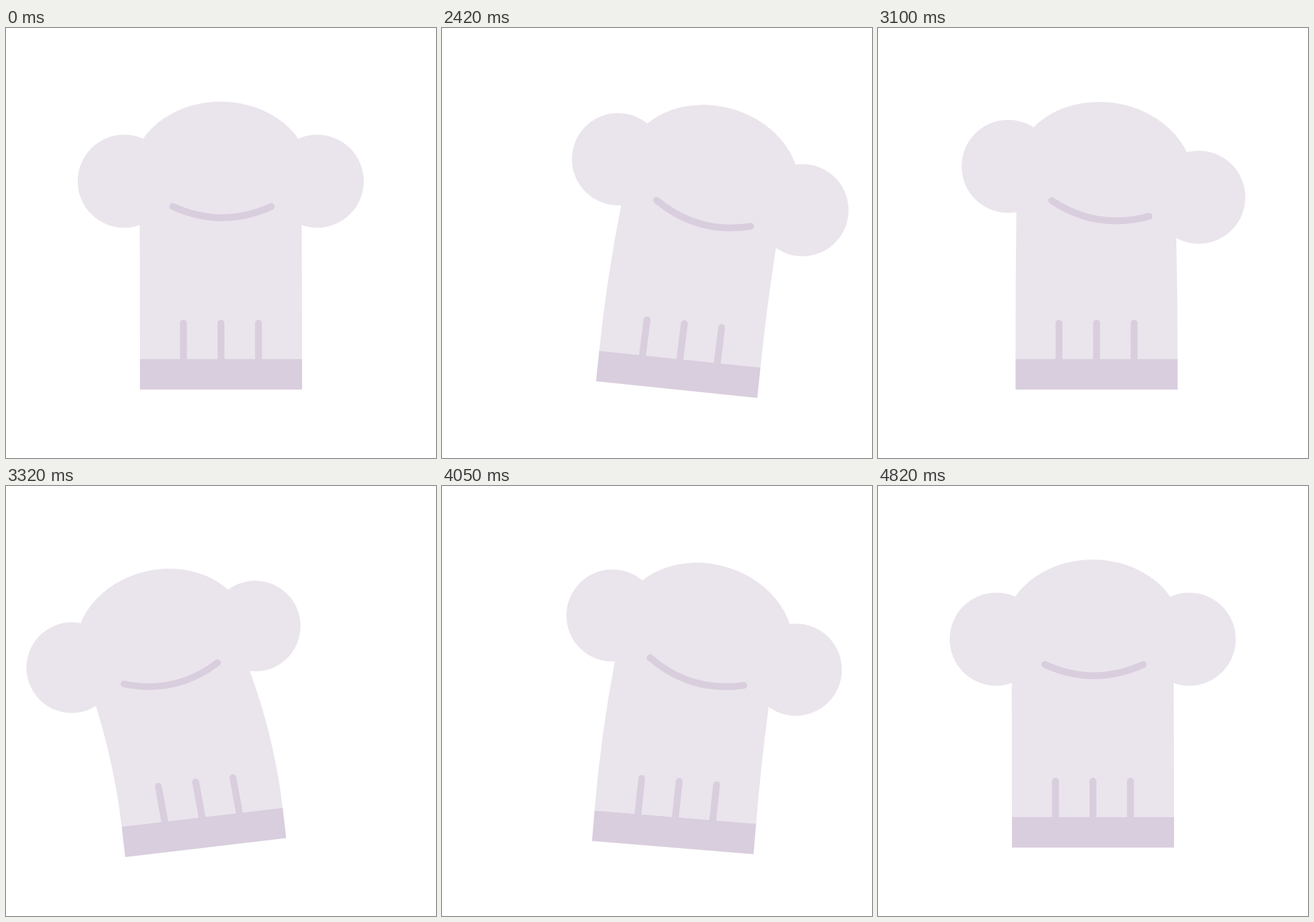
These frames come from a looping animation (748x748 px, 4850 ms). An HTML page with a canvas:

```html
<!DOCTYPE html>
<html lang="en">
<head>
<meta charset="utf-8">
<title>Swinging chef hat</title>
<style>
html, body { margin: 0; width: 100%; height: 100%; overflow: hidden; background: #fff; }
canvas { display: block; }
</style>
</head>
<body>
<canvas id="stage" width="748" height="748"></canvas>
<script>
const ctx = document.getElementById('stage').getContext('2d');
const LOOP = 4850, LIGHT = '#eae5ec', DARK = '#d9cede';
const NECK = 77.5, BODY = 232, BAND = 53;

// Start and end of each swing: right, left, right, left, rest
const swings = [[2000, 2645], [2760, 3490], [3500, 4050], [4060, 4390], [4400, 4740]];

function ease(u) {
  u = Math.min(1, Math.max(0, u));
  return u * u * u * (u * (6 * u - 15) + 10);
}

// Value that eases from one swing's peak to the next, then back to zero
function swing(t, ...peaks) {
  let value = 0, last = 0;
  swings.forEach(([start, end], i) => {
    const peak = peaks[i] || 0;
    value += (peak - last) * ease((t - start) / (end - start));
    last = peak;
  });
  return value;
}

// Maps points of a moved, tilted and scaled part onto the stage
function part(x, y, r, scale = 1) {
  const cos = Math.cos(r) * scale, sin = Math.sin(r) * scale;
  return {
    at: (px, py) => [x + px * cos - py * sin, y + px * sin + py * cos],
    use: () => ctx.setTransform(cos, sin, -sin, cos, x, y),
    r
  };
}

// The band leads the swing, the crown's tilt trails it
function poseAt(t) {
  const rad = Math.PI / 180;
  const bandX = swing(t + 20, 42, -31, 27.5, -9);
  const tilt = swing(t + 20, 7.25, -7.6, 4.7, -1.6) * rad;
  const crownX = 373.5 + swing(t - 5, 123, -122, 82.5, -35);
  const crownTilt = swing(t - 42, 23.4, -19.1, 16.6, -6.5) * rad;
  const band = part(374 + bandX, 629, tilt);

  // The body keeps its length, apart from a little squash as it bends
  const [topX, topY] = band.at(0, -BAND);
  const dx = crownX - NECK * Math.sin(crownTilt) - topX;
  const bend = Math.asin(dx / BODY) - tilt;
  const length = BODY - 525 * bend * bend;
  const crownY = topY - Math.sqrt(length * length - dx * dx) - NECK * Math.cos(crownTilt);
  const crown = part(crownX, crownY, crownTilt, 1 - 0.26 * Math.abs(bend));
  return { band, crown, bend };
}

function ellipse(x, y, rx, ry) {
  ctx.beginPath();
  ctx.ellipse(x, y, rx, ry, 0, 0, 2 * Math.PI);
  ctx.fill();
}

function drawBody(band, crown) {
  const side = x => {
    const from = band.at(x, -BAND + 1), to = crown.at(x, NECK);
    const half = Math.hypot(to[0] - from[0], to[1] - from[1]) / 2;
    const mid = [from[0] + half * Math.sin(band.r), from[1] - half * Math.cos(band.r)];
    return { from, mid, to };
  };
  const left = side(-141), right = side(141);
  ctx.beginPath();
  ctx.moveTo(...left.from);
  ctx.quadraticCurveTo(...left.mid, ...left.to);
  ctx.lineTo(...crown.at(-141, 0));
  ctx.lineTo(...crown.at(141, 0));
  ctx.lineTo(...right.to);
  ctx.quadraticCurveTo(...right.mid, ...right.from);
  ctx.fill();
}

function draw(t) {
  const { band, crown, bend } = poseAt(t);

  ctx.resetTransform();
  ctx.fillStyle = '#fff';
  ctx.fillRect(0, 0, 748, 748);
  ctx.fillStyle = LIGHT;
  drawBody(band, crown);

  crown.use();
  ellipse(-168, 0, 81, 81);
  ellipse(168, 0, 81, 81);
  ellipse(0, -10.5, 155.6, 128);

  // The fold slides down as the crown tilts
  const fold = 44 + 102 * crown.r * crown.r;
  ctx.strokeStyle = ctx.fillStyle = DARK;
  ctx.lineWidth = 12;
  ctx.lineCap = 'round';
  ctx.beginPath();
  ctx.moveTo(-83.5, fold);
  ctx.quadraticCurveTo(2.3, fold + 39, 88, fold);
  ctx.stroke();

  // Pleats lean part of the way into the bend
  const lean = 0.65 * bend;
  band.use();
  ctx.beginPath();
  for (const x of [-65.3, 0, 65.3]) {
    ctx.moveTo(x, -BAND + 3);
    ctx.lineTo(x + 62.5 * Math.sin(lean), -BAND - 62.5 * Math.cos(lean));
  }
  ctx.stroke();
  ctx.fillRect(-141, -BAND, 282, BAND);
}

const start = performance.now();
function tick() {
  draw((performance.now() - start) % LOOP);
  requestAnimationFrame(tick);
}
tick();
</script>
</body>
</html>
```
